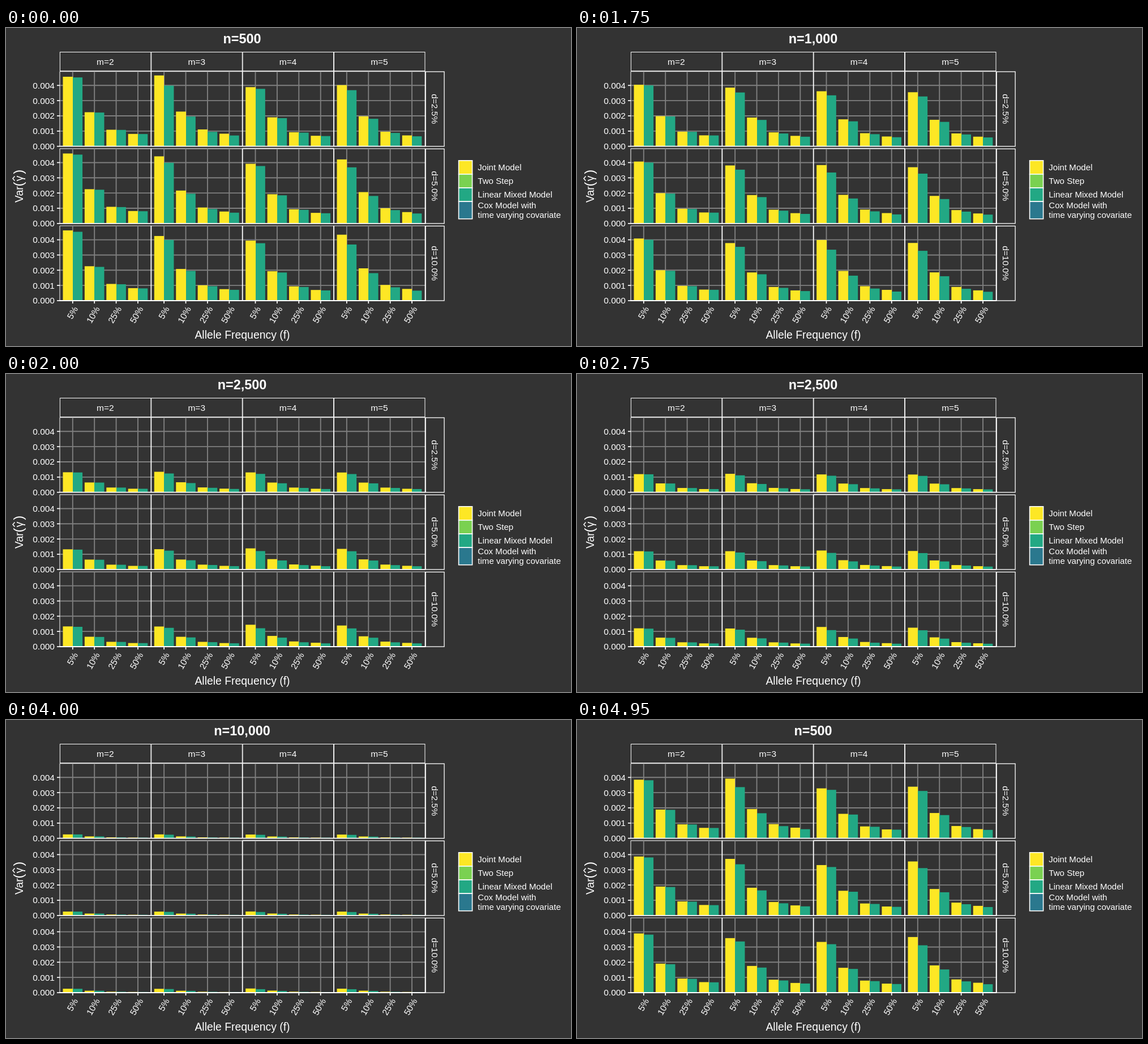
Write an HTML page that moves like this. It is 998x561 px and loops after 5 s.

```html
<!DOCTYPE html>
<html lang="en">
<head>
<meta charset="utf-8">
<title>Variance by allele frequency</title>
<style>
html, body { margin: 0; width: 100%; height: 100%; overflow: hidden; background: #333; }
svg { display: block; width: 998px; height: 561px; }
text { font-family: "Liberation Sans", Arial, sans-serif; font-size: 15.5px; fill: #fff; }
</style>
</head>
<body>
<svg id="chart" viewBox="0 0 998 561"></svg>
<script>
const svg = document.getElementById('chart');
const YELLOW = '#fde725', LIME = '#7ad151', GREEN = '#22a884', BLUE = '#2a788e';
const GRID = '#7f7f7f', WHITE = '#fff';
const UNIT = 26.85;                     // pixels per 0.001
const PANEL_W = 161.35, PANEL_H = 132;
const freqs = ['5%', '10%', '25%', '50%'];
const rows = ['2.5%', '5.0%', '10.0%'].map((d, r) => {
  const base = 208.7 + 136.15 * r;
  return { d, base, top: base - PANEL_H };
});
const panelX = k => 95 + PANEL_W * k;
const tickX = (k, i) => panelX(k) + 22.8 + 38.4 * i;

function add(tag, attrs, body) {
  const el = document.createElementNS('http://www.w3.org/2000/svg', tag);
  for (const key in attrs) el.setAttribute(key, attrs[key]);
  if (body) el.textContent = body;
  svg.appendChild(el);
  return el;
}
const line = (x1, y1, x2, y2, stroke = WHITE, width = 1.7) =>
  add('line', { x1, y1, x2, y2, stroke, 'stroke-width': width });
const box = (x, y, width, height, fill = 'none', stroke = 1) =>
  add('rect', { x, y, width, height, fill, stroke: WHITE, 'stroke-width': stroke });
const label = (body, x, y, anchor = 'middle', more = {}) =>
  add('text', { x, y, 'text-anchor': anchor, ...more }, body);

// The mixed model falls from peak to floor across panels; the joint model exceeds
// it by a gain per panel that drifts from the first row to the last.
const smallGain = { first: [1.01, 1.167, 1.03, 1.09], last: [1.02, 1.065, 1.045, 1.175] };
const largeGain = { first: [1.01, 1.09, 1.08, 1.085], last: [1.02, 1.07, 1.19, 1.158] };
const states = [
  { n: 'n=500', peak: 121.5, floor: 97.5, gain: smallGain },
  { n: 'n=1,000', peak: 122, floor: 97.5, gain: largeGain },
  { n: 'n=2,500', peak: 35, floor: 32, gain: largeGain },
  { n: 'n=5,000', peak: 15.5, floor: 12.2, gain: largeGain },
  { n: 'n=10,000', peak: 6.8, floor: 6, gain: largeGain }
];
const share = [1, 0.49, 0.238, 0.178];  // height relative to the 5% bar
const mix = (a, b, p) => a + (b - a) * p;

function barHeight({ peak, floor, gain }, { r, k, i, joint }) {
  const mixed = mix(floor, peak, 0.4 ** k) * share[i];
  return joint ? mixed * mix(gain.first[k], gain.last[k], [0, 0.6, 1][r]) : mixed;
}

// Grid and bars
const bars = [];
rows.forEach(({ base, top }, r) => {
  line(95, top, panelX(4), top, '#e0e0e0', 1.2);
  for (let g = 1; g <= 4; g++) line(95, base - UNIT * g, panelX(4), base - UNIT * g, GRID, 1.9);
  for (let k = 0; k < 4; k++)
    for (let i = 0; i < 4; i++) line(tickX(k, i), top, tickX(k, i), base, GRID, 1.9);
  for (let k = 0; k < 4; k++)
    for (let i = 0; i < 4; i++) {
      const x = tickX(k, i), mid = Math.round(x), half = 17.3;
      const bar = (joint, left, right) => bars.push({ r, k, i, joint, base,
        el: add('rect', { x: left, width: right - left, fill: joint ? YELLOW : GREEN }) });
      bar(true, x - half, mid);
      bar(false, mid, x + half);
    }
});

// Borders, axes and strips
rows.forEach(({ d, base, top }) => {
  line(95, top, 95, base, '#cfcfcf', 1.3);
  for (let k = 1; k < 4; k++) line(panelX(k), top, panelX(k), base, WHITE, 1.8);
  line(94.5, base, 741, base, WHITE, 1.8);
  line(740.6, top, 740.6, base, WHITE, 1.8);
  box(741, top + 0.4, 33.1, PANEL_H - 0.4, 'none', 1.3);
  label('d=' + d, 0, 5.5, 'middle', { transform: `translate(757.3 ${base - 66}) rotate(90)` });
  for (let g = 0; g <= 4; g++) {
    const y = base - UNIT * g;
    line(90, y, 95, y);
    label('0.00' + g, 86, Math.round(y + 5.4), 'end');
  }
});
line(panelX(2), 212.5, panelX(3), 212.5);
for (let k = 0; k < 4; k++) {
  box(panelX(k) + 0.4, 42.5, PANEL_W - 0.8, 33.3);
  label('m=' + (k + 2), panelX(k) + 80.4, 65);
  freqs.forEach((f, i) => {
    const x = tickX(k, i);
    line(x, 481, x, 486);
    label(f, 0, 5.5, 'end', { transform: `translate(${x + 5.2} 492.5) rotate(-60)` });
  });
}

// Titles
const title = label('', 417, 27, 'middle', { style: 'font-size:23.4px;font-weight:bold' });
label('Allele Frequency (f)', 417.5, 548, 'middle', { style: 'font-size:19.4px' });
const side = { transform: 'translate(30 308) rotate(-90)' };
const sideText = (body, x, y, size) =>
  label(body, x, y, 'start', { ...side, style: `font-size:${size}px` });
sideText('Var', 0, 0, 19.4);
sideText('(', 28.5, -0.5, 24);
sideText('γ', 37.7, 0, 19.4);
sideText(')', 50.3, -0.5, 24);
add('path', { ...side, d: 'M38.5 -14.5l4 -3.5l4 3.5', fill: 'none', stroke: WHITE, 'stroke-width': 1.5 });

// Legend
[YELLOW, LIME, GREEN, BLUE].forEach((fill, i) =>
  box(799.6, 233.8 + 24.1 * i, 24, i < 3 ? 24.1 : 30.6, fill, 1.6));
[['Joint Model', 251], ['Two Step', 275], ['Linear Mixed Model', 299],
 ['Cox Model with', 318], ['time varying covariate', 335]].forEach(([body, y]) =>
  label(body, 833.3, y, 'start', { style: 'font-size:15.1px' }));

// Each state holds 750 ms, then moves linearly to the next in six 50 ms steps.
function draw(time) {
  const t = time % 5000, at = Math.floor(t / 1000), local = t - at * 1000;
  const p = local < 750 ? 0 : (Math.floor((local - 750) / 50) + 1) / 6;
  const from = states[at], to = states[(at + 1) % states.length];
  title.textContent = (p < 0.5 ? from : to).n;
  for (const bar of bars) {
    const h = mix(barHeight(from, bar), barHeight(to, bar), p);
    bar.el.setAttribute('y', bar.base - h);
    bar.el.setAttribute('height', h);
  }
}
const start = performance.now();
function tick() {
  draw(performance.now() - start);
  requestAnimationFrame(tick);
}
tick();
</script>
</body>
</html>
```
